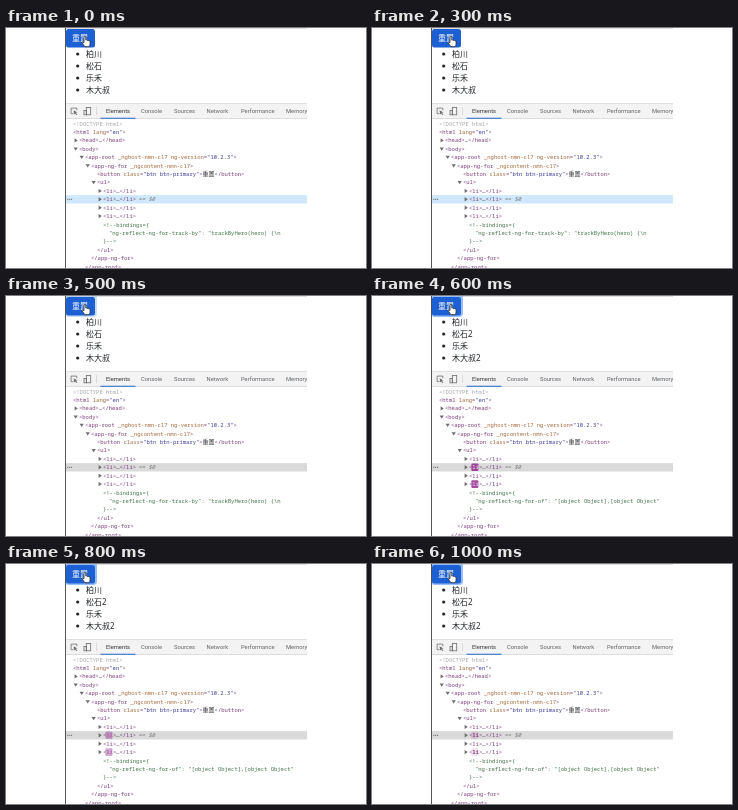
Recreate the animation shown at these times as an HTML page with a canvas. Size 360 px wide and 240 px high, loop 1.1 s.

```html
<!DOCTYPE html>
<html lang="en">
<head>
<meta charset="utf-8">
<title>List refresh</title>
<style>
html, body { margin: 0; width: 100%; height: 100%; overflow: hidden; background: #fff; }
canvas { display: block; width: 360px; height: 240px; }
</style>
</head>
<body>
<canvas id="stage"></canvas>
<script>
const canvas = document.getElementById('stage');
const ctx = canvas.getContext('2d');
const ratio = window.devicePixelRatio || 1;
canvas.width = 360 * ratio;
canvas.height = 240 * ratio;

const LOOP = 1100, STEP = 100;
const LEFT = 59, RIGHT = 301;
const CHAR = 3.3, ROW = 8.41, FIRST_ROW = 95.6;
const MONO = '5.5px "Noto Sans Mono", monospace';
const CJK = '"Noto Sans CJK SC", "Noto Sans CJK", sans-serif';
const TAG = '#7c3f78', NAME = '#a5683a', VALUE = '#3a3a9c';
const COMMENT = '#44704a', INK = '#303134', GREY = '#a5a5a5';

const names = ['柏川', '松石', '乐禾', '木大叔'];
const tabs = [['Elements', 100], ['Console', 135], ['Sources', 168],
  ['Network', 200.5], ['Performance', 235], ['Memory', 280]];

// Each line: indent x, markup, arrow (open / closed / none)
const lines = [
  [67, '<!DOCTYPE html>'],
  [67, '<html lang="en">'],
  [73, '<head>…</head>', 'closed'],
  [73, '<body>', 'open'],
  [79, '<app-root _nghost-nmn-c17 ng-version="10.2.3">', 'open'],
  [85, '<app-ng-for _ngcontent-nmn-c17>', 'open'],
  [91, '<button class="btn btn-primary">重置</button>'],
  [91, '<ul>', 'open'],
  [97, '<li>…</li>', 'closed'],
  [97, '<li>…</li>', 'closed'],
  [97, '<li>…</li>', 'closed'],
  [97, '<li>…</li>', 'closed'],
  [97, '<!--bindings={'],
  [103, ''],
  [97, '}-->'],
  [91, '</ul>'],
  [85, '</app-ng-for>'],
  [79, '</app-root>']
];
const SELECTED = 9, BINDING = 13;
const trackBinding = '"ng-reflect-ng-for-track-by": "trackByHero(hero) {\\n';
const listBinding = '"ng-reflect-ng-for-of": "[object Object],[object Object"';

const rowY = i => FIRST_ROW + ROW * i;

function rect(x, y, w, h, color) {
  ctx.fillStyle = color;
  ctx.fillRect(x, y, w, h);
}

function roundRect(x, y, w, h, r, color) {
  ctx.fillStyle = color;
  ctx.beginPath();
  ctx.roundRect(x, y, w, h, r);
  ctx.fill();
}

function text(str, x, y, color, font) {
  ctx.font = font;
  ctx.fillStyle = color;
  ctx.fillText(str, x, y);
}

function polygon(points, color) {
  ctx.fillStyle = color;
  ctx.beginPath();
  points.forEach(([x, y]) => ctx.lineTo(x, y));
  ctx.fill();
}

function markup(str, x, y) {
  for (const part of str.match(/"[^"]*"| [\w-]+|…|[重置]+|[^" …重置]+/g)) {
    const chinese = part[0] === '重';
    const color = part[0] === '"' ? VALUE : part[0] === ' ' ? NAME
      : chinese || part === '…' ? INK : TAG;
    text(part, x, y, color, chinese ? '6px ' + CJK : MONO);
    x += chinese ? 12 : part.length * CHAR;
  }
}

function arrow(kind, x, y) {
  const points = kind === 'open'
    ? [[x - 5.4, y - 1.4], [x - 1.2, y - 1.4], [x - 3.3, y + 1.8]]
    : [[x - 4.4, y - 2.2], [x - 1.2, y], [x - 4.4, y + 2.2]];
  polygon(points, '#6e6e6e');
}

function drawPage(updated, focus) {
  rect(LEFT, 0, RIGHT - LEFT, 0.6, '#c8c8c8');
  if (focus) roundRect(LEFT, -2, 32, 23, 4, `rgba(150,190,248,${focus})`);
  roundRect(60, 1, 29, 18.6, 2.5, '#1c60d4');
  text('重置', 66, 13.3, '#fff', '8px ' + CJK);

  names.forEach((name, i) => {
    const y = 26 + 12 * i;
    ctx.fillStyle = '#212529';
    ctx.beginPath();
    ctx.arc(71.7, y, 1.6, 0, Math.PI * 2);
    ctx.fill();
    text(name + (updated && i % 2 ? '2' : ''), 80, y + 3, '#212529',
      '8px "Noto Sans", ' + CJK);
  });
}

function drawPointer() {
  const hand = new Path2D('M78 8.6q1-1 1.8.2v3.3q1-.6 1.6.3q1-.4 1.5.4q1.2-.3 1.2.9v2.4q-.2 1.4-1 2.6h-4.3q-1.3-2.2-2.8-4q0-1.3 2-.2z');
  ctx.lineWidth = 0.8;
  ctx.strokeStyle = '#222';
  ctx.fillStyle = '#fff';
  ctx.fill(hand);
  ctx.stroke(hand);
}

function drawToolbar() {
  rect(LEFT, 75.4, RIGHT - LEFT, 15.1, '#f3f3f3');
  rect(LEFT, 75.4, RIGHT - LEFT, 0.6, '#d0d0d0');
  rect(LEFT, 90.2, RIGHT - LEFT, 0.6, '#cccccc');
  ctx.strokeStyle = '#6e6e6e';
  ctx.lineWidth = 0.8;
  ctx.stroke(new Path2D('M67.5 85.7h-2.4v-5.6h5.7v2.2'));
  ctx.strokeRect(80.3, 79.4, 4.4, 7.4);
  ctx.strokeRect(78, 82.4, 2.3, 4.4);
  polygon([[67.6, 82.2], [71.5, 84.4], [69.8, 84.8], [71.3, 86.5],
    [70.5, 87.1], [69.1, 85.4], [68.1, 86.5]], '#6e6e6e');
  rect(90, 79, 0.6, 8, '#cccccc');
  tabs.forEach(([label, x], i) =>
    text(label, x, 85.1, i ? '#5f6368' : '#333', '5.8px Roboto, sans-serif'));
  rect(94.5, 89.7, 35, 1.2, '#3f7fd0');
}

// Fresh nodes light up, then both box and label fade back.
function drawFlash(row, amount) {
  const y = rowY(row), fade = c => Math.round(c + (255 - c) * amount);
  roundRect(99.4, y - 3.8, 7, 7.6, 1, `rgba(136,18,128,${0.75 * amount})`);
  text('li', 97 + CHAR, y + 2, `rgb(${fade(136)},${fade(40)},${fade(128)})`, MONO);
}

function drawTree(updated, focused, flash) {
  const y = rowY(SELECTED);
  rect(LEFT, y - 4.2, RIGHT - LEFT, 8.4, focused ? '#dadada' : '#cfe8fc');
  for (let i = 0; i < 3; i++) rect(61.2 + i * 1.9, y - 0.5, 1.1, 1.1, '#6e6e6e');
  text('== $0', 132.5, y + 2, '#777', 'italic ' + MONO);

  lines.forEach(([x, str, kind], i) => {
    const base = rowY(i) + 2;
    if (kind) arrow(kind, x, rowY(i));
    if (i === 0) text(str, x, base, GREY, MONO);
    else if (i >= 12 && i <= 14) {
      const content = i === BINDING ? (updated ? listBinding : trackBinding) : str;
      text(content, x, base, COMMENT, MONO);
    } else markup(str, x, base);
  });
  if (flash) [SELECTED, SELECTED + 2].forEach(row => drawFlash(row, flash));
}

function render(ms) {
  const step = Math.floor((ms % LOOP) / STEP);
  const updated = step >= 6, focused = step >= 5;
  const flash = updated ? Math.pow(1 - (step - 6) / 7, 2.2) : 0;

  ctx.setTransform(ratio, 0, 0, ratio, 0, 0);
  rect(0, 0, 360, 240, '#fff');
  ctx.save();
  ctx.beginPath();
  ctx.rect(LEFT, 0, RIGHT - LEFT, 240);
  ctx.clip();
  drawPage(updated, focused ? (updated ? 1 : 0.5) : 0);
  drawToolbar();
  drawTree(updated, focused, flash);
  rect(LEFT, 0, 0.9, 240, '#444');
  drawPointer();
  ctx.restore();
}

let start;
function tick(now) {
  start ??= now;
  render(now - start);
  requestAnimationFrame(tick);
}
render(0);
requestAnimationFrame(tick);
</script>
</body>
</html>
```
